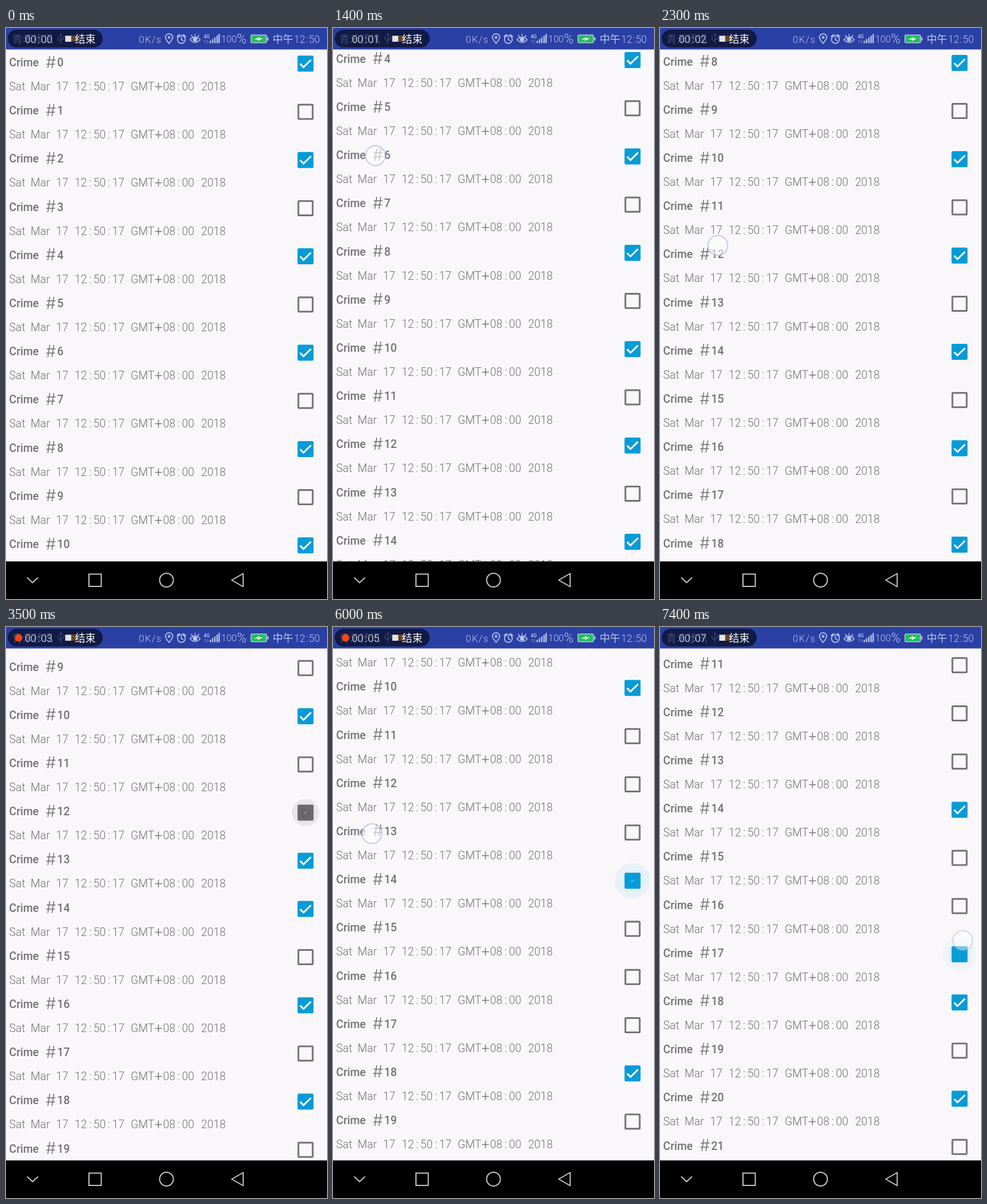
Animation, 561 px wide and 998 px high, one loop 7.5 s. Source, as an HTML page:

```html
<!DOCTYPE html>
<html lang="zh">
<head>
<meta charset="utf-8">
<title>Crime list</title>
<style>
  html, body { margin: 0; width: 100%; height: 100%; overflow: hidden; background: #f9f7fa; }
  svg { display: block; width: 100vw; height: 100vh; }
  text { font-family: Roboto, "Noto Sans CJK SC", "Noto Sans CJK", sans-serif; font-weight: 300; }
  .line { fill: none; stroke-linecap: round; stroke-linejoin: round; }
</style>
</head>
<body>
<svg id="stage" viewBox="0 0 561 998" preserveAspectRatio="none">
  <rect width="561" height="998" fill="#f9f7fa"/>
  <g id="list"></g>
  <g id="ripples"></g>

  <g id="status">
    <rect width="561" height="37.500" fill="#2a40a4"/>
    <g class="line" stroke="#b9c4ee" stroke-width="1.7">
      <path d="M285 27C281 22 278.600 19 278.600 16.500A6.400 6.400 0 0 1 291.400 16.500C291.400 19 289 22 285 27Z"/>
      <circle cx="285" cy="16.500" r="1.600"/>
      <circle cx="306.500" cy="20" r="6.800"/>
      <path d="M306.500 16V20.500L309.500 22M299 15L303 11.500M314 15L310 11.500"/>
      <path d="M321.500 20.500Q330.500 10.500 339.500 20.500Q330.500 30 321.500 20.500ZM330.500 11V13M324 13L325.500 15M337 13L335.500 15"/>
      <circle cx="330.500" cy="20" r="3" fill="#b9c4ee"/>
      <path d="M348 21V26M346.500 22.500L348 21M352 21V26M353.500 24.500L352 26" stroke="#7787cc" stroke-width="1"/>
    </g>
    <path d="M357 26.500V22.500M361 26.500V19.500M365 26.500V16.500M369 26.500V13.500M372.500 26.500V10.500" stroke="#b9c4ee" stroke-width="2.400"/>
    <rect x="428.200" y="12.200" width="27" height="13.600" rx="1.500" fill="#22c05a" stroke="#b9c4ee" stroke-width="1.600"/>
    <path d="M457.600 16V22" stroke="#b9c4ee" stroke-width="2.200"/>
    <path d="M434 20.500L443 15.500L442 18.300L449 17.800L440 23L441 20Z" fill="#fff"/>
  </g>

  <g id="pill">
    <rect x="3" y="3" width="166" height="31" rx="15.500" fill="#111a42"/>
    <g opacity=".75">
      <path class="line" d="M96 10V27M91 15V20L96 23M101 14V18L96 21M94 12L96 10L98 12" stroke="#45507f" stroke-width="1.500"/>
      <rect x="114" y="13" width="11" height="11" fill="#80571c"/>
    </g>
    <rect x="103.500" y="13.500" width="10.500" height="10.500" fill="#e2e3ea"/>
    <circle id="rec" cx="22" cy="19" r="6.500" fill="#ff4517"/>
  </g>

  <rect y="932.300" width="561" height="66" fill="#000"/>
  <g class="line" stroke="#c6c6c6" stroke-width="2">
    <path d="M37.500 961L46.500 969.500L55.500 961"/>
    <rect x="145" y="954.500" width="21.500" height="21.500" stroke-linejoin="miter"/>
    <circle cx="280.500" cy="965" r="12"/>
    <path d="M394.500 965L414.500 953.500V976.500Z"/>
  </g>
  <circle id="touch" r="17.300" fill="#fff" fill-opacity=".58" stroke="#9db0e0" stroke-opacity=".6" stroke-width="2"/>
</svg>
<script>
const NS = 'http://www.w3.org/2000/svg';
const $ = id => document.getElementById(id);
const LOOP = 7500, PITCH = 84.2, BOX_X = 523.5;
const BLUE = '#079bd7', GREY = '#737176', PAPER = '#f9f7fa';

// [time, scroll offset]
const SCROLL = [[600, 0], [1000, 205], [1400, 343], [1600, 390], [1800, 400], [2300, 675],
  [2600, 735], [2900, 748.3], [5900, 748.3], [6000, 797.7], [6300, 880], [6500, 912], [6800, 921.7]];
// [down, up, x at down, x at up, finger y plus scroll offset]
const DRAGS = [[600, 1450, 108, 72, 566], [1800, 2600, 106, 98, 1055], [5900, 6300, 66, 74, 1159]];
// [time, row, new state, touch x, touch y, release]
const TAPS = [[3060, 13, 1, 524, 412, 3120], [3400, 12, 0, 521, 333, 3400],
  [3760, 13, 0, 526, 414, 3800], [4130, 14, 0, 528, 495, 4170], [4500, 15, 1, 530, 577, 4540],
  [5160, 16, 0, 533, 648, 5200], [5480, 15, 0, 530, 572, 5520], [5860, 14, 1, 526, 488, 5880],
  [7275, 17, 1, 529, 548, 7375]];

const clamp = v => Math.max(0, Math.min(1, v));
const lerp = (a, b, k) => a + (b - a) * k;

function set(el, attrs) {
  for (const k in attrs) el.setAttribute(k, attrs[k]);
  return el;
}
function make(tag, parent, attrs) {
  return parent.appendChild(set(document.createElementNS(NS, tag), attrs));
}
function label(parent, str, x, y, size, fill, more = {}) {
  const el = make('text', parent, { x, y, 'font-size': size, fill, ...more });
  el.textContent = str;
  return el;
}
// Pairs of digits with wide colons between them
function clock(parent, str, x, y, size, fill, step) {
  return str.split(':').map((part, i) => {
    if (i) label(parent, ':', x + i * step - (step - size * 1.13) / 2, y, size, fill, { 'text-anchor': 'middle' });
    return label(parent, part, x + i * step, y, size, fill);
  });
}
// Square centred on the origin
function square(el, size, more) {
  return set(el, { x: -size / 2, y: -size / 2, width: size, height: size, ...more });
}

function makeRow() {
  const g = make('g', $('list'));
  const dark = '#737177', pale = '#747278', medium = { style: 'font-weight:500' };
  label(g, 'Crime', 5.5, 7, 19.4, dark, medium);
  label(g, '#', 69.5, 9.5, 28, dark, { style: 'font-family:Inter,sans-serif' });
  const num = label(g, '', 89.5, 7, 19.4, dark, medium);
  for (const [word, x] of [['Sat', 5.5], ['Mar', 43], ['17', 87.5], ['GMT', 218], ['2018', 341]])
    label(g, word, x, 49, 19.4, pale);
  label(g, '+', 259.5, 51, 25, pale);
  clock(g, '12:50:17', 120, 49, 19.4, pale, 32.8);
  clock(g, '08:00', 274.5, 49, 19.4, pale, 33);
  const box = make('g', g, { transform: `translate(${BOX_X} 2.3)` });
  const frame = square(make('rect', box), 28, { rx: 2.5 });
  const hole = make('rect', box, { fill: PAPER });
  const tick = make('path', box, { d: 'M-9.500 0.300L-3.600 6.300L9.500 -6.600', fill: 'none', stroke: '#fff', 'stroke-width': 3 });
  return { g, num, frame, hole, tick };
}

const rows = Array.from({ length: 12 }, makeRow);
const ripples = TAPS.map(() => [0, 1].map(() => make('circle', $('ripples'))));

const light = '#bcc7f0';
label($('status'), '0K/s', 232, 25.5, 17, light, { 'letter-spacing': 1.2 });
label($('status'), '4G', 345.5, 17.5, 8.5, light, { style: 'font-weight:500' });
label($('status'), '100', 376, 25, 16.5, light);
label($('status'), '%', 403.5, 26.5, 23, light);
label($('status'), '中午', 466, 26, 18, light);
clock($('status'), '12:50', 503.5, 26, 17.5, light, 25.5);
const carrier = label($('pill'), '青禾移讯', 11, 26, 18, '#414b78');
$('pill').insertBefore(carrier, $('pill').children[1]);
label($('pill'), '结束', 120.5, 26, 18, '#fff', { style: 'font-weight:400' });
const timer = clock($('pill'), '00:00', 33, 26, 18, '#fff', 28);

function scrollAt(t) {
  if (t <= SCROLL[0][0]) return 0;
  for (let i = 1; i < SCROLL.length; i++) {
    const [t0, y0] = SCROLL[i - 1], [t1, y1] = SCROLL[i];
    if (t <= t1) return lerp(y0, y1, (t - t0) / (t1 - t0));
  }
  return SCROLL[SCROLL.length - 1][1];
}

// Checked state of a row and how far its tick has grown
function stateAt(row, t) {
  let on = row % 2 ? 0 : 1, amount = on;
  for (const [start, r, next] of TAPS) {
    if (r !== row || t < start) continue;
    amount = lerp(on, next, clamp((t - start) / 240));
    on = next;
  }
  return { on, amount };
}

// The square fills inwards first, then the tick grows
function drawBox({ frame, hole, tick }, { on, amount }) {
  set(frame, { fill: on ? BLUE : GREY });
  square(hole, lerp(22, 0, clamp(amount * 2)));
  const grow = clamp(amount * 2 - 1) ** 0.7;
  set(tick, { transform: `scale(${grow})`, visibility: grow ? 'visible' : 'hidden' });
}

function drawRipple([back, front], [start, row, on, x, y], t, off) {
  const age = t - start;
  const cy = 62.3 + row * PITCH - off;
  const fade = age < 0 ? 0 : 1 - clamp((age - 250) / 200);
  const k = clamp(age / 140), fill = on ? BLUE : '#000';
  set(back, { cx: BOX_X, cy, r: 31 * clamp(age / 130), fill, opacity: (on ? 0.035 : 0.07) * fade });
  set(front, { cx: lerp(x, BOX_X, k), cy: lerp(y, cy, k), r: 31 * k ** 3.5, fill, opacity: 0.045 * fade });
}

function drawTouch(t, off) {
  let best = { x: 0, y: 0, a: 0 };
  const show = (down, up, x, y) => {
    const a = t < down ? 0 : 1 - clamp((t - up) / 100);
    if (a > best.a) best = { x, y, a };
  };
  for (const [down, up, x0, x1, sum] of DRAGS)
    show(down, up, lerp(x0, x1, clamp((t - down) / (up - down))), sum - off);
  for (const [start, , , x, y, up] of TAPS) show(start - 110, up, x, y);
  set($('touch'), { cx: best.x, cy: best.y, opacity: best.a });
}

function draw(t) {
  const off = scrollAt(t), first = Math.floor(off / PITCH);
  rows.forEach((row, k) => {
    const i = first + k;
    set(row.g, { transform: `translate(0 ${60 + i * PITCH - off})` });
    row.num.textContent = i;
    drawBox(row, stateAt(i, t));
  });
  TAPS.forEach((tap, i) => drawRipple(ripples[i], tap, t, off));
  drawTouch(t, off);
  const run = Math.max(0, t - 50);
  timer[1].textContent = '0' + Math.floor(run / 1000);
  const lit = t >= 200 && (t < 600 || run % 1000 >= 400);
  set($('rec'), { visibility: lit ? 'visible' : 'hidden' });
}

function hold(t) {
  return t < 200 ? 0 : t < 600 ? 200 : Math.floor(t / 100) * 100;
}

const begin = performance.now();
function tick() {
  draw(hold((performance.now() - begin) % LOOP));
  requestAnimationFrame(tick);
}
tick();
</script>
</body>
</html>
```
